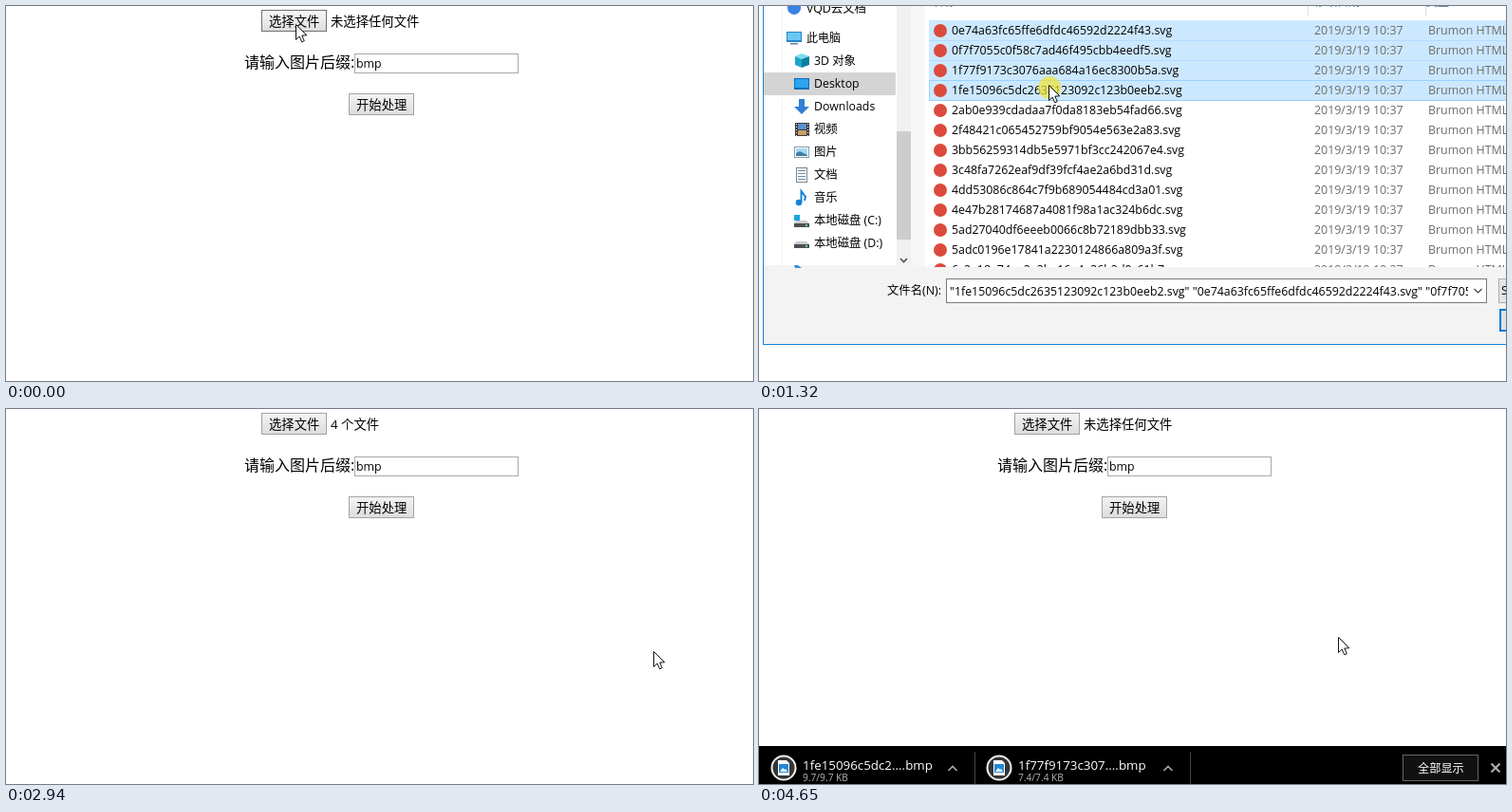
Animation, 787 px wide and 395 px high, one loop 4.82 s. Source, as an HTML page with a canvas:

```html
<!DOCTYPE html>
<html lang="zh-CN">
<head>
<meta charset="utf-8">
<title>图片格式转换</title>
<style>
html, body { margin: 0; width: 787px; height: 395px; overflow: hidden; background: #fff; }
canvas { display: block; }
</style>
</head>
<body>
<canvas id="stage" width="787" height="395"></canvas>
<script>
const W = 787, H = 395, LOOP = 4820;
const page = document.getElementById('stage').getContext('2d');
const layer = document.createElement('canvas');
layer.width = W;
layer.height = H;
const win = layer.getContext('2d');
let g = page;

// The screen refreshes in bursts: first time, last time, number of steps
const BURSTS = [
  [80, 560, 7], [640, 1090, 7], [1170, 1400, 4], [1550, 2010, 7], [2100, 2240, 3],
  [2390, 2880, 7], [2940, 3400, 7], [3490, 3950, 7], [4040, 4500, 7], [4590, 4650, 2]
];
// Pointer: time, x, y
const PATH = [
  [0, 305, 19], [320, 305, 19], [560, 374, 31], [860, 374, 31], [1090, 305, 83], [1500, 305, 83],
  [2010, 779, 332], [2080, 792, 332], [2780, 792, 334], [2880, 724, 281], [2940, 682, 255],
  [3360, 390, 102], [3560, 390, 102], [3950, 604, 262], [4040, 605, 258], [4430, 610, 240]
];
const FILES = [
  '0e74a63fc65ffe6dfdc46592d2224f43', '0f7f7055c0f58c7ad46f495cbb4eedf5',
  '1f77f9173c3076aaa684a16ec8300b5a', '1fe15096c5dc2635123092c123b0eeb2',
  '2ab0e939cdadaa7f0da8183eb54fad66', '2f48421c065452759bf9054e563e2a83',
  '3bb56259314db5e5971bf3cc242067e4', '3c48fa7262eaf9df39fcf4ae2a6bd31d',
  '4dd53086c864c7f9b689054484cd3a01', '4e47b28174687a4081f98a1ac324b6dc',
  '5ad27040df6eeeb0066c8b72189dbb33', '5adc0196e17841a2230124866a809a3f',
  '6c2a18a74ea2e3ba16e4a36b2d0c61b7'
].map(n => n + '.svg');
const DOWNLOADS = [
  [3500, '0e74a63fc65ff....bmp', '6.1/6.1 KB'],
  [3620, '0f7f7055c0f58c....bmp', '5.7/5.7 KB'],
  [3740, '1f77f9173c307....bmp', '7.4/7.4 KB'],
  [3862, '1fe15096c5dc2....bmp', '9.7/9.7 KB']
];
const PLACES = ['3D 对象', 'Desktop', 'Downloads', '视频', '图片', '文档', '音乐', '本地磁盘 (C:)', '本地磁盘 (D:)'];

const clamp = v => Math.max(0, Math.min(1, v));
const inside = (p, x, y, w, h) => p.x >= x && p.x < x + w && p.y >= y && p.y < y + h;

function rect(x, y, w, h, color) {
  g.fillStyle = color;
  g.fillRect(x, y, w, h);
}
function frame(x, y, w, h, color, line = 1) {
  g.strokeStyle = color;
  g.lineWidth = line;
  g.strokeRect(x + line / 2, y + line / 2, w - line, h - line);
}
function disc(x, y, r, color) {
  g.fillStyle = color;
  g.beginPath();
  g.arc(x, y, r, 0, 7);
  g.fill();
}
function trace(points) {
  g.beginPath();
  points.forEach(([x, y]) => g.lineTo(x, y));
}
function poly(points, color) {
  trace(points);
  g.fillStyle = color;
  g.fill();
}
function stroke(points, color, line) {
  trace(points);
  g.strokeStyle = color;
  g.lineWidth = line;
  g.stroke();
}
function text(s, x, y, size = 12.35, color = '#000') {
  g.font = `${size}px "Open Sans", "Noto Sans CJK SC", "Noto Sans CJK", sans-serif`;
  g.fillStyle = color;
  g.fillText(s, x, y);
}
function clipped(x, y, w, h, draw) {
  g.save();
  g.beginPath();
  g.rect(x, y, w, h);
  g.clip();
  draw();
  g.restore();
}

function stepTime(t) {
  let now = 0;
  for (const [a, b, n] of BURSTS) {
    const d = (b - a) / (n - 1);
    const i = Math.floor((t - a) / d + 0.2);
    if (i >= 0) now = a + d * Math.min(i, n - 1);
  }
  return now;
}
function pointerAt(t) {
  const i = PATH.findIndex(k => k[0] > t);
  if (i < 0) return { x: 610, y: 240 };
  const [a, x0, y0] = PATH[i - 1], [b, x1, y1] = PATH[i];
  const p = (t - a) / (b - a);
  return { x: Math.round(x0 + (x1 - x0) * p), y: Math.round(y0 + (y1 - y0) * p) };
}

function pointer({ x, y }) {
  const shape = [[0, 0], [0, 16], [3.7, 12.6], [6.2, 18.3], [8.8, 17.2], [6.3, 11.6], [11.3, 11.3]]
    .map(([a, b]) => [x + a + 0.5, y + b + 0.5]);
  poly(shape, '#fff');
  g.closePath();
  g.strokeStyle = '#111';
  g.lineWidth = 1;
  g.stroke();
}
function button(label, x, y, hover) {
  const fill = g.createLinearGradient(0, y, 0, y + 23);
  fill.addColorStop(0, hover ? '#f8f8f8' : '#f4f4f4');
  fill.addColorStop(1, '#dcdcdc');
  rect(x, y, 69, 23, fill);
  frame(x, y, 69, 23, hover ? '#707070' : '#a3a3a3');
  text(label, x + 8, y + 17, 13.33);
}
function form(t, p) {
  rect(0, 0, W, H, '#fff');
  button('选择文件', 269, 4, inside(p, 269, 4, 69, 23));
  text(t >= 2390 && t < 3560 ? '4 个文件' : '未选择任何文件', 342, 21, 13.33);
  text('请输入图片后缀:', 251, 65, 16);
  frame(367, 50, 173, 21, '#a9a9a9');
  text('bmp', 369, 65);
  button('开始处理', 361, 92, inside(p, 361, 92, 69, 23));
}

const ICONS = [
  y => {
    poly([[38, y - 5], [45, y - 8], [53, y - 5], [45, y - 2]], '#7fdcee');
    poly([[38, y - 5], [45, y - 2], [45, y + 7], [38, y + 4]], '#1ba5c4');
    poly([[53, y - 5], [45, y - 2], [45, y + 7], [53, y + 4]], '#0b7f9f');
  },
  y => {
    rect(37, y - 6, 16, 12, '#0b6fb8');
    rect(38, y - 5, 14, 9, '#2aa4ee');
  },
  y => poly([[42, y - 8], [48, y - 8], [48, y], [53, y], [45, y + 8], [37, y], [42, y]], '#2f7fd3'),
  y => {
    rect(38, y - 7, 15, 14, '#3c3c3c');
    rect(41, y - 6, 9, 6, '#5b8fd0');
    rect(41, y + 1, 9, 5, '#c8a060');
    for (let i = -6; i < 7; i += 3) {
      rect(39, y + i, 1, 1, '#fff');
      rect(51, y + i, 1, 1, '#fff');
    }
  },
  y => {
    rect(37, y - 6, 16, 12, '#8a9aa8');
    rect(38, y - 5, 14, 10, '#fff');
    rect(39, y - 4, 12, 8, '#a8d8f5');
    poly([[39, y + 4], [39, y + 1], [43, y - 1], [51, y + 3], [51, y + 4]], '#3d7ea6');
  },
  y => {
    rect(39, y - 8, 12, 16, '#fff');
    frame(39, y - 8, 12, 16, '#7d858c');
    for (let i = -5; i < 6; i += 3) rect(41, y + i, 8, 1, '#668aa8');
  },
  y => {
    disc(42, y + 5, 3.3, '#1583d8');
    stroke([[44.5, y + 5], [44.5, y - 7], [49, y - 1], [48, y + 3]], '#1583d8', 2);
  },
  y => {
    rect(37, y - 6, 6, 6, '#18a4e0');
    drive(y + 2);
  },
  y => drive(y)
];
function drive(y) {
  poly([[39, y - 2], [50, y - 2], [53, y + 1], [37, y + 1]], '#c9cdd0');
  rect(37, y + 1, 16, 4, '#4a5055');
  rect(49, y + 2, 2, 2, '#6fe06f');
}

function sidebar() {
  rect(24, 0, 1, 273, '#f3f3f3');
  rect(145, 0, 15, 273, '#f0f0f0');
  rect(145, 132, 15, 114, '#cdcdcd');
  stroke([[149, 266], [152.5, 269.5], [156, 266]], '#505050', 1.6);
  rect(160, 0, 15, 273, '#f7f7f7');
  disc(37, 2, 7, '#3b82e8');
  text('VQD云文档', 50, 7);
  rect(29, 27, 16, 11, '#2385c8');
  rect(30, 28, 14, 8, '#6cc6f4');
  rect(33, 39, 8, 1.5, '#5b7f98');
  text('此电脑', 50, 38, 12);
  rect(5, 70, 139, 24, '#d4d4d4');
  PLACES.forEach((name, i) => {
    const y = 58 + 24 * i;
    ICONS[i](y);
    text(name, 58, y + 4);
  });
  poly([[37, 273], [41, 273], [45, 276], [38, 276]], '#3c8ed0');
}

function list(t, p) {
  const count = t >= 1240 ? 4 : t >= 780 ? 1 : 0;
  [['名称', 183], ['修改日期', 585], ['类型', 703]].forEach(([s, x]) => text(s, x, 0, 12, '#5a6a80'));
  rect(578, 0, 1, 10, '#dcdcdc');
  rect(702, 0, 1, 10, '#dcdcdc');
  clipped(175, 0, 612, 275, () => FILES.forEach((name, i) => {
    // Rows share their border line, so the translucent selection overlaps by 1px
    const y = 15 + 21 * i, hover = inside(p, 179, y, 608, 21);
    if (i < count) rect(179, y, 608, 22, 'rgba(153,209,255,.5)');
    else if (hover) rect(179, y, 608, 22, '#e5f3ff');
    if (count && i === count - 1) frame(179, y, 620, 22, '#99d1ff');
    disc(191, y + 11, 7, '#dc4a3d');
    text(name, 203, y + 15);
    text('2019/3/19 10:37', 585, y + 15, 12.4, '#6d6d6d');
    text('Brumon HTML', 705, y + 15, 12.4, '#6d6d6d');
  }));
  return count;
}

function footer(count, p) {
  rect(175, 275, W, 82, '#f3f3f3');
  text('文件名(N):', 135, 304);
  rect(197, 287, 570, 26, '#fff');
  frame(197, 287, 570, 26, count ? '#7a7a7a' : '#0078d7');
  const picked = count > 1 ? `"${FILES[3]}" "${FILES[0]}" "${FILES[1]}"` : FILES[0];
  if (count) clipped(198, 288, 549, 24, () => text(picked, 201, 305));
  else rect(201, 292, 1, 17, '#000');
  stroke([[753.5, 298], [757.5, 302], [761.5, 298]], '#444', 1.2);
  rect(779, 287, 20, 26, '#e4e4e4');
  frame(779, 287, 20, 26, '#adadad');
  text('S', 782, 304);
  const over = inside(p, 778, 319, 40, 25);
  rect(780, 319, 20, 24, over ? '#e5f1fb' : '#e1e1e1');
  frame(780, 319, 20, 24, '#0078d7', over ? 1 : 2);
}

function picker(t, p) {
  const alpha = t < 1000 ? clamp((t - 170) / 240) : 1 - clamp((t - 2390) / 190);
  if (!alpha) return;
  g = win;
  g.clearRect(0, 0, W, H);
  rect(4, 0, W, 357, '#fff');
  rect(5, 273, 170, 83, '#f3f3f3');
  sidebar();
  footer(list(t, p), p);
  rect(4, 0, 1, 357, '#1883d7');
  rect(4, 356, W, 1, '#1883d7');
  g = page;
  g.globalAlpha = alpha;
  g.drawImage(layer, 0, 0);
  g.globalAlpha = 1;
}

function item(x, width, name, size) {
  clipped(x, 355, width, 40, () => {
    disc(x + 26, 378, 13.5, '#f2f2f2');
    disc(x + 26, 378, 11.5, '#353535');
    poly([[x + 20, 370], [x + 29, 370], [x + 32, 373], [x + 32, 386], [x + 20, 386]], '#fff');
    rect(x + 21, 374, 10, 9, '#2387d4');
    poly([[x + 22, 382], [x + 25, 378], [x + 27, 380], [x + 28, 379], [x + 30, 382]], '#fff');
    text(name, x + 46, 380, 13.35, '#fff');
    text(size, x + 46, 392, 10.2, '#b4b4b4');
    const c = x + width - 23;
    stroke([[c - 4.5, 381], [c, 376.5], [c + 4.5, 381]], '#a8a8a8', 1.6);
  });
  rect(x + width, 361, 1, 34, '#454545');
}
function shelf(t) {
  const open = clamp((t - 3490) / 120);
  if (!open) return;
  g.save();
  g.translate(0, Math.round(40 * (1 - open)));
  rect(0, 355, W, 40, '#000');
  const shown = DOWNLOADS.filter(d => d[0] <= t).reverse();
  let x = 0;
  shown.forEach(([start, name, size], i) => {
    const rest = 1 - clamp((t - start) / 800);
    const width = i ? 227 : Math.round(227 * (1 - rest * rest));
    if (x + width <= 678) item(x, width, name, size);
    x += width;
  });
  rect(678, 364, 80, 28, '#111');
  frame(678, 364, 80, 28, '#666');
  text('全部显示', 694, 383, 12.2, '#fff');
  stroke([[771.5, 373.5], [780.5, 382.5]], '#b0b0b0', 2);
  stroke([[780.5, 373.5], [771.5, 382.5]], '#b0b0b0', 2);
  g.restore();
}

// Badge that drops towards the shelf when a download begins
function badge(t, start, end, ring) {
  const v = (t - start) / 600;
  if (v <= 0 || v >= 1) return;
  const c = Math.round(end - 72 * (1 - v)), blue = '#4a88f2';
  g.globalAlpha = Math.min(1, v * 5, (1 - v) * 10.5);
  disc(33, c, 37, `rgba(255,255,255,${ring})`);
  disc(33, c, 27, 'rgba(255,255,255,.82)');
  poly([[29, c - 22], [37, c - 22], [37, c - 12], [43, c - 12], [33, c - 2], [23, c - 12], [29, c - 12]], blue);
  rect(17, c + 12, 32, 4, blue);
  g.globalAlpha = 1;
}

function draw(t) {
  const p = pointerAt(t);
  form(t, p);
  picker(t, p);
  shelf(t);
  badge(t, 3620, 318, 0.1);
  badge(t, 3740, 318, 0.1);
  badge(t, 3500, 358, 0.8);
  if ([80, 780, 1240, 3400].some(c => t >= c && t < c + 150)) disc(p.x + 1, p.y + 3, 12, 'rgba(240,228,50,.7)');
  pointer(p);
}

const begin = performance.now();
function tick() {
  draw(stepTime((performance.now() - begin) % LOOP));
  requestAnimationFrame(tick);
}
tick();
</script>
</body>
</html>
```
